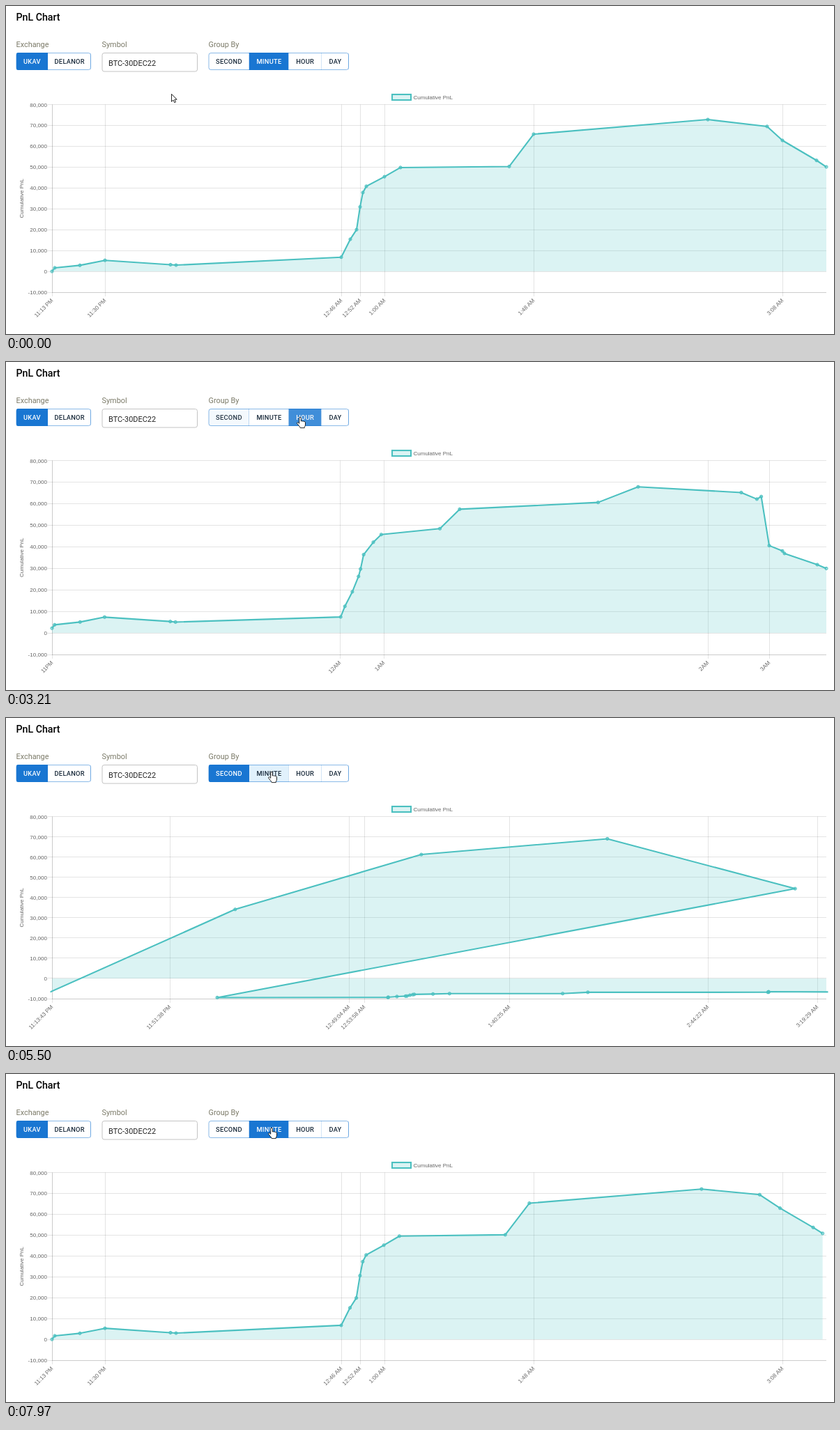
Write an HTML page that moves like this. It is 1188x471 px and loops after 8000 ms.

```html
<!DOCTYPE html>
<html lang="en">
<head>
<meta charset="utf-8">
<title>PnL Chart</title>
<style>
  html, body { margin: 0; width: 100%; height: 100%; overflow: hidden; background: #fff; }
  svg { display: block; }
  .ui { font-family: Roboto, sans-serif; font-size: 10.9px; }
  .title { font-size: 14.2px; font-weight: 500; }
  .label { fill: #7b7a68; }
  .btn { font-size: 9.3px; font-weight: 500; letter-spacing: .27px; text-anchor: middle; }
  .axis { font: 8.1px "Liberation Sans", Arial, sans-serif; fill: #666; }
  .frame { fill: none; stroke: #1976d2; stroke-opacity: .5; }
  .grid { stroke: #000; stroke-opacity: .12; stroke-width: .9; fill: none; }
</style>
</head>
<body>
<svg width="1188" height="471" viewBox="0 0 1188 471">
  <clipPath id="round">
    <rect x="14.5" y="67" width="107.5" height="25" rx="3"/>
    <rect x="290.5" y="67" width="201.5" height="25" rx="3"/>
  </clipPath>
  <g class="ui">
    <text class="title" x="14.5" y="20.6">PnL Chart</text>
    <g class="label">
      <text x="14.5" y="59">Exchange</text>
      <text x="137.5" y="59">Symbol</text>
      <text x="290.5" y="59">Group By</text>
    </g>
    <rect x="138" y="67.5" width="136.5" height="26.5" rx="3" fill="none" stroke="#c4c4c4"/>
    <text x="147" y="85.5" fill="#222">BTC-30DEC22</text>
    <g id="buttons" class="btn" clip-path="url(#round)"></g>
    <rect class="frame" x="15" y="67.5" width="106.5" height="24" rx="3"/>
    <rect class="frame" x="291" y="67.5" width="200.5" height="24" rx="3"/>
  </g>
  <g class="axis">
    <rect x="554" y="127" width="27" height="8" fill="#4bc0c0" fill-opacity=".2" stroke="#4bc0c0" stroke-width="2.1"/>
    <text x="584.5" y="133.7" style="font-size:8px">Cumulative PnL</text>
  </g>
  <g id="chart"></g>
  <g id="cursor"></g>
</svg>
<script>
const LOOP = 8000, ANIM = 950, TOP = 141.5, TEAL = '#4bc0c0';
const $ = id => document.getElementById(id);
const clamp = x => Math.min(1, Math.max(0, x));
const mix = (a, b, p) => a + (b - a) * p;
const outQuart = x => 1 - (1 - clamp(x)) ** 4;

// cubic-bezier(.4, 0, .2, 1)
function ease(x) {
  x = clamp(x);
  let lo = 0, hi = 1, u = .5;
  for (let i = 0; i < 14; i++) {
    u = (lo + hi) / 2;
    if (1.2 * (1 - u) ** 2 * u + .6 * (1 - u) * u * u + u ** 3 < x) lo = u; else hi = u;
  }
  return 3 * (1 - u) * u * u + u ** 3;
}

// Data: x position, value in hundreds
const pairs = s => s.split(' ').map(p => p.split(',').map(Number));
const byMinute = pairs('66,0 70,17 106,29 142,53 236,32 244,30 481,68 494,154 503,200 508,309 512,378 517,408 543,454 566,498 722,503 757,658 1007,728 1092,695 1114,628 1163,532 1177,501');
const bySecond = pairs('66,0 69.5,16 106.5,30 141,53 235.5,32 242.5,29 479.5,43 480,67 492,154 504,200 506,210 510,308 514,377 516,408 542,454 565,499 722,503 757,659 1007,662 1008,680 1008,725 1095,694 1114,649 1117,628 1164,534 1177,502');
const byHour = [29, 406, 656, 727, 500].map((v, i) => [63 + 277 * i, v]);

const ticks = s => s.split('|').map(p => p.split('='));
const minuteTicks = ticks('66=11:13:00 PM|142=11:30:00 PM|481=12:46:00 AM|508=12:52:00 AM|543=1:00:00 AM|757=1:48:00 AM|1114=3:08:00 AM');
const secondTicks = ticks('66=11:13:43 PM|235=11:51:38 PM|492=12:49:04 AM|514=12:53:58 AM|722=1:40:25 AM|1007=2:44:22 AM|1164=3:19:29 AM');
const mixedTicks = ticks('66=11:13:43 PM|479=12:46:16 AM|542=1:00:05 AM|1007=2:44:22 AM|1095=3:04:03 AM');
const hourTicks = ticks('63=11:00:00 PM|340=12:00:00 AM|617=1:00:00 AM|894=2:00:00 AM|1171=3:00:00 AM');

const units = {
  second: { bottom: 403, format: s => s },
  minute: { bottom: 411, format: s => s.replace(/:\d\d /, ' ') },
  hour: { bottom: 420, format: s => s.replace(/:.* /, '') }
};

function stage(start, unit, data, marks) {
  const hourly = data === byHour;
  const s = { start, data, marks, hourly, ...units[unit],
    min: hourly ? 0 : -100, left: hourly ? 63 : 66, right: hourly ? 1171 : 1177 };
  s.y = v => mix(s.bottom, TOP, (v - s.min) / (800 - s.min));
  return s;
}
const stages = [
  stage(-LOOP, 'minute', byMinute, minuteTicks),
  stage(1452, 'second', byMinute, minuteTicks),
  stage(3038, 'hour', bySecond, mixedTicks),
  stage(3407, 'hour', byHour, hourTicks),
  stage(5000, 'second', byHour, hourTicks),
  stage(5491, 'second', bySecond, secondTicks),
  stage(7000, 'minute', bySecond, secondTicks),
  stage(7422, 'minute', byMinute, minuteTicks)
];

// Points glide from wherever they were; new ones rise from the old zero line.
function pose(k, t) {
  const s = stages[k], goal = s.data.map(([x, v]) => [x, s.y(v)]);
  if (!k) return goal;
  const last = stages[k - 1], from = pose(k - 1, s.start), p = outQuart((t - s.start) / ANIM);
  return goal.map(([x, y], i) => {
    const [fx, fy] = from[i] || [last.hourly ? 123 + (x - 66) * 1.035 : x, last.y(0)];
    return [mix(fx, x, p), mix(fy, y, p)];
  });
}

function drawChart(t) {
  const k = stages.findLastIndex(s => t >= s.start), s = stages[k];
  const { left, right, bottom } = s, points = pose(k, t);
  const snap = v => Math.floor(v) + .5;
  let grid = `M${left + .5} ${TOP}V${bottom + .5}M${left} ${bottom + .5}H${right}`, labels = '';
  for (let v = s.min; v <= 800; v += 100) {
    const y = s.y(v);
    grid += `M${left - 6} ${snap(y)}H${right}`;
    labels += `<text x="${left - 7}" y="${y + 3}" text-anchor="end">${(v * 100).toLocaleString('en-US')}</text>`;
  }
  for (const [x, name] of s.marks) {
    grid += `M${+x + .5} ${TOP}V${bottom + 6}`;
    labels += `<text transform="translate(${x} ${bottom + 10.5}) rotate(-45)" y="2.8" text-anchor="end">${s.format(name)}</text>`;
  }
  const line = points.map(p => p.map(n => n.toFixed(2)).join(' ')).join('L');
  const zero = s.y(0), end = points[points.length - 1][0];
  const dots = points.filter(([x]) => x >= left - .5 && x <= right + .5)
    .map(([x, y]) => `<circle cx="${x}" cy="${y}" r="2.1"/>`).join('');
  const clip = (id, m) => `<clipPath id="${id}"><rect x="${left - m}" y="${TOP - m}" width="${right - left + 2 * m}" height="${bottom - TOP + 2 * m}"/></clipPath>`;
  $('chart').innerHTML = clip('area', 0) + clip('halo', 2.5) +
    `<path class="grid" d="${grid}"/><g class="axis">${labels}
    <text transform="translate(22 ${(TOP + bottom) / 2}) rotate(-90)" y="2.8" text-anchor="middle" style="font-size:8px">Cumulative PnL</text></g>
    <path d="M${points[0][0]} ${zero}L${line}L${end} ${zero}Z" fill="${TEAL}" fill-opacity=".2" clip-path="url(#area)"/>
    <path d="M${line}" fill="none" stroke="${TEAL}" stroke-width="2.1" stroke-linejoin="round" clip-path="url(#halo)"/>
    <g fill="${TEAL}" fill-opacity=".45" stroke="${TEAL}">${dots}</g>`;
}

// Buttons: name, left, right, times selected, times hovered
const ALWAYS = [[-LOOP, 2 * LOOP]];
const buttons = [
  ['UKAV', 14.5, 60, ALWAYS, []],
  ['DELANOR', 60, 122, [], []],
  ['SECOND', 290.5, 349, [[1440, 3038], [5000, 7000]], [[780, 2805], [3770, 5150]]],
  ['MINUTE', 349, 405.5, [[-LOOP, 1440], [7000, 2 * LOOP]], [[2810, 2900], [3555, 3770], [5150, 2 * LOOP]]],
  ['HOUR', 405.5, 452.5, [[3038, 5000]], [[2900, 3555]]],
  ['DAY', 452.5, 492, [], []]
];
// Presses: button, down, up, x, y
const presses = [
  ['SECOND', 1290, 1440, 328, 85], ['HOUR', 2930, 3038, 422, 80],
  ['SECOND', 4850, 5000, 328, 81], ['MINUTE', 6850, 7000, 381, 78]
];
const level = (spans, t) => spans.reduce((sum, [a, b]) => sum + ease((t - a) / 235) - ease((t - b) / 235), 0);
const blend = (a, b, p) => a.map((v, i) => mix(v, b[i], p));
const rgb = c => `rgb(${c.map(Math.round)})`;
const WHITE = [255, 255, 255], BLUE = [25, 118, 210], TINT = [225, 241, 252], INK = [26, 43, 60];

function drawButtons(t) {
  $('buttons').innerHTML = buttons.map(([name, x, end, picked, hovered]) => {
    const on = level(picked, t), w = end - x;
    const back = rgb(blend(blend(WHITE, TINT, level(hovered, t)), BLUE, on));
    const ink = rgb(blend(INK, WHITE, on));
    const ripple = presses.filter(p => p[0] === name && t > p[1]).map(([, down, up, px, py]) => {
      const grow = ease((t - down) / 510);
      return `<circle cx="${px - x}" cy="${py - 67}" r="${41 * grow}" fill="${ink}" opacity="${mix(.1, .3, grow) * (1 - ease((t - up) / 510))}"/>`;
    }).join('');
    return `<svg x="${x}" y="67" width="${w}" height="25"><rect width="${w}" height="25" fill="${back}"/>
      <text x="${w / 2 + .2}" y="15.8" fill="${ink}">${name}</text>${ripple}
      <path class="frame" d="M${w} 0V25"/></svg>`;
  }).join('');
}

// Pointer: time, x, y of the tip
const path = [[0, 237, 126], [180, 237, 126], [950, 327, 84], [2780, 327, 84], [2930, 422, 79],
  [3500, 422, 79], [3840, 327, 79], [5080, 327, 79], [5300, 381, 77], [LOOP, 381, 77]];
const ARROW = 'M.5 .5V11.3L3 9l1.7 3.7 1.8-.8L4.9 8.2H8.2Z';
const HAND = 'M-1.3 9V1.6a1.3 1.3 0 0 1 2.6 0V6q1.2-.9 2.2.2 1.2-.7 2.1.4 1.6-.4 1.9 1V11q0 1.9-1.2 3.3V15.6H.2q-.3-1.5-2-3.2L-4.3 9.3q-.5-1.3.7-1.6 1 0 2.3 1.6Z';

function drawCursor(t) {
  const i = path.findIndex(p => t < p[0]), [a, ax, ay] = path[i - 1], [b, bx, by] = path[i];
  const p = (t - a) / (b - a), x = mix(ax, bx, p), y = mix(ay, by, p);
  $('cursor').innerHTML = `<path transform="translate(${x} ${y})" d="${y < 92 ? HAND : ARROW}" fill="#fff" stroke="#111" stroke-width=".9" stroke-linejoin="round"/>`;
}

function frame(now) {
  const t = now % LOOP;
  drawChart(t);
  drawButtons(t);
  drawCursor(t);
  requestAnimationFrame(frame);
}
requestAnimationFrame(frame);
</script>
</body>
</html>
```
